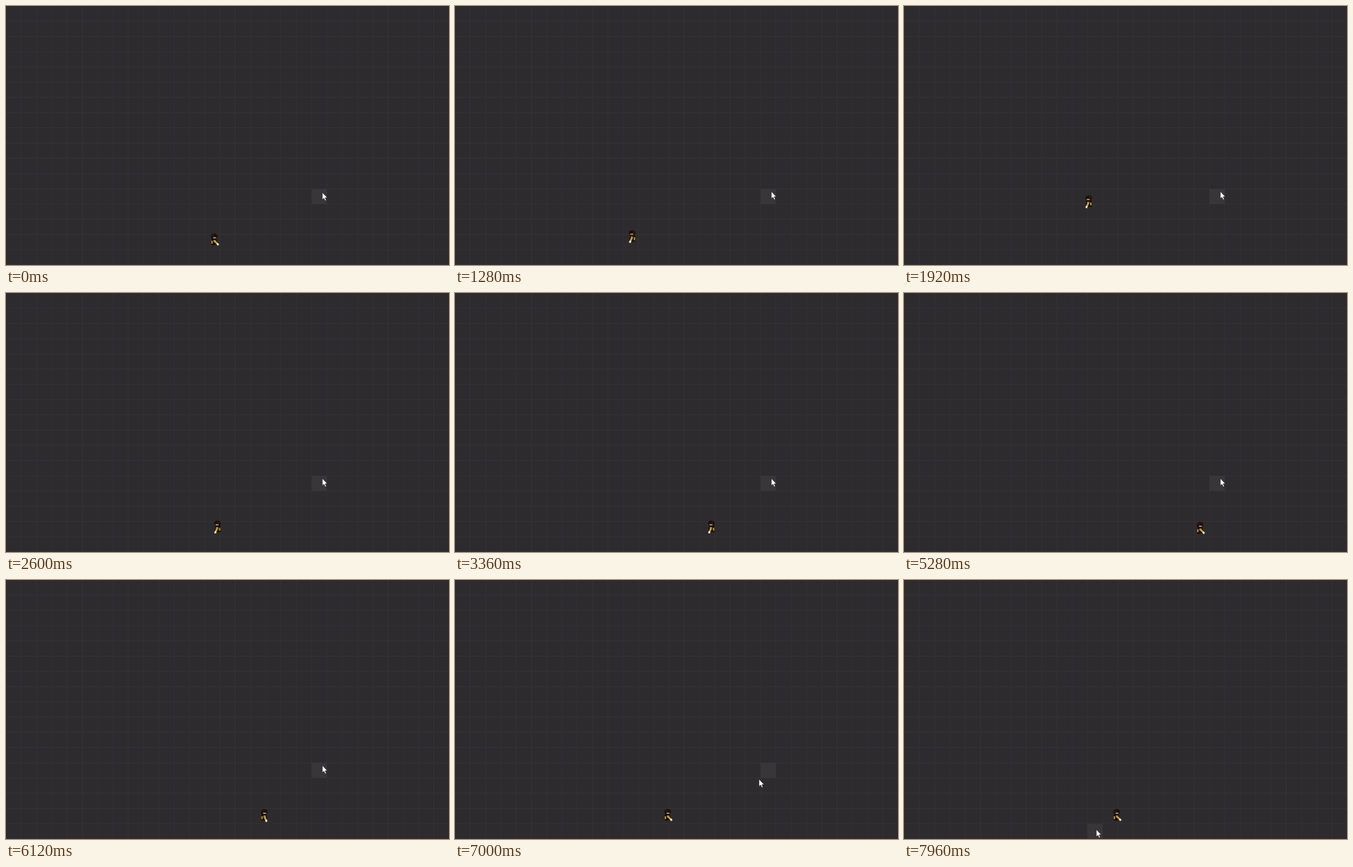
An HTML page that plays this animation: 600x352 px, repeating every 8 s.

```html
<!DOCTYPE html>
<html lang="en">
<head>
<meta charset="utf-8">
<title>Grid walk</title>
<style>
html, body { margin: 0; width: 100%; height: 100%; overflow: hidden; background: #2d2b2e; }
svg { display: block; width: 600px; height: 352px; }
</style>
</head>
<body>
<svg viewBox="0 0 600 352">
  <rect width="600" height="352" fill="#2d2b2e"/>
  <path id="grid" fill="none" stroke="#343235"/>
  <rect id="tile" width="20.7" height="20.7" fill="#383639"/>
  <g id="hero">
    <path d="M-4-2H3L4 5L1 7H-4Z" fill="#17110c"/>
    <path d="M-4 1h2v4h-2zM-1 0h3v3h-3z" fill="#a5822e"/>
    <ellipse cy="-5" rx="4.4" ry="3.5" fill="#1b100b"/>
    <path d="M-3-6h3" stroke="#3c2418"/>
    <path d="M-1.5-3h4" stroke="#a67c53" stroke-width="2"/>
    <g id="arm" stroke-width="2.4">
      <path d="M1 0H6" stroke="#c6a650"/>
      <path d="M5.5 0H8.3" stroke="#fff8dc"/>
    </g>
  </g>
  <path id="cursor" d="M0 0V10.2L2.3 8.2L3.9 11.6L5.6 10.8L4.1 7.5H7.1Z" fill="#fff" stroke="#1b1a1c" stroke-width=".7"/>
</svg>
<script>
const LOOP = 8000, STEP = 40, CELL = 20.7, SPEED = 0.08;
const $ = id => document.getElementById(id);
const place = (id, x, y, more = "") => $(id).setAttribute("transform", `translate(${x} ${y}) ${more}`);
const clamp = k => Math.max(0, Math.min(1, k));
const mix = (a, b, k) => a + (b - a) * k;

// Legs of the walk: [pause before, dx, dy], all at the same pace.
const legs = [
  [520, -42, 0], [200, 0, -22], [0, 10, -10], [0, 0, -20], [0, 0, 20],
  [0, 34, 34], [0, 148, 0], [382, -31, 0], [290, -113, 0]
];

function heroAt(t) {
  const pose = { x: 282, y: 318, side: 1, moving: false };
  for (const [pause, dx, dy] of legs) {
    t -= pause;
    if (t < 0) break;
    const span = Math.max(Math.abs(dx), Math.abs(dy)) / SPEED;
    const k = clamp(t / span);
    pose.x += dx * k;
    pose.y += dy * k;
    pose.side = dx < 0 ? 1 : -1;
    pose.moving = k < 1;
    t -= span;
    if (t < 0) break;
  }
  return pose;
}

// The pointer rests, sweeps down to the left, then slides along the last row.
function cursorAt(t) {
  const sweep = clamp((t - 6910) / 650), slide = clamp((t - 7560) / 240);
  return {
    x: mix(428, 308, sweep) - 48 * slide,
    y: mix(253, 251.6, clamp(t / 880)) + 87 * Math.sin(sweep * Math.PI / 2)
  };
}

function drawGrid() {
  let d = "";
  for (let p = CELL; p < 600; p += CELL) {
    d += `M${p} 0V352`;
    if (p < 352) d += `M0 ${p}H600`;
  }
  $("grid").setAttribute("d", d);
}

function render(time) {
  const t = Math.floor(time % LOOP / STEP) * STEP;
  const hero = heroAt(t);
  const bob = hero.moving && Math.floor(t / 170) % 2 ? -2 : 0;
  place("hero", hero.x, hero.y + bob, `scale(${hero.side} 1)`);
  place("arm", 0, 1, `rotate(${hero.moving ? 66 : 45})`);

  const tip = cursorAt(t);
  place("cursor", tip.x + 0.3, tip.y + 0.2);

  // The highlighted cell follows the pointer a little late.
  const late = cursorAt(t - STEP);
  $("tile").setAttribute("x", Math.floor(late.x / CELL) * CELL);
  $("tile").setAttribute("y", Math.floor(late.y / CELL) * CELL);
}

drawGrid();
const start = performance.now();
function tick() {
  render(performance.now() - start);
  requestAnimationFrame(tick);
}
tick();
</script>
</body>
</html>
```
